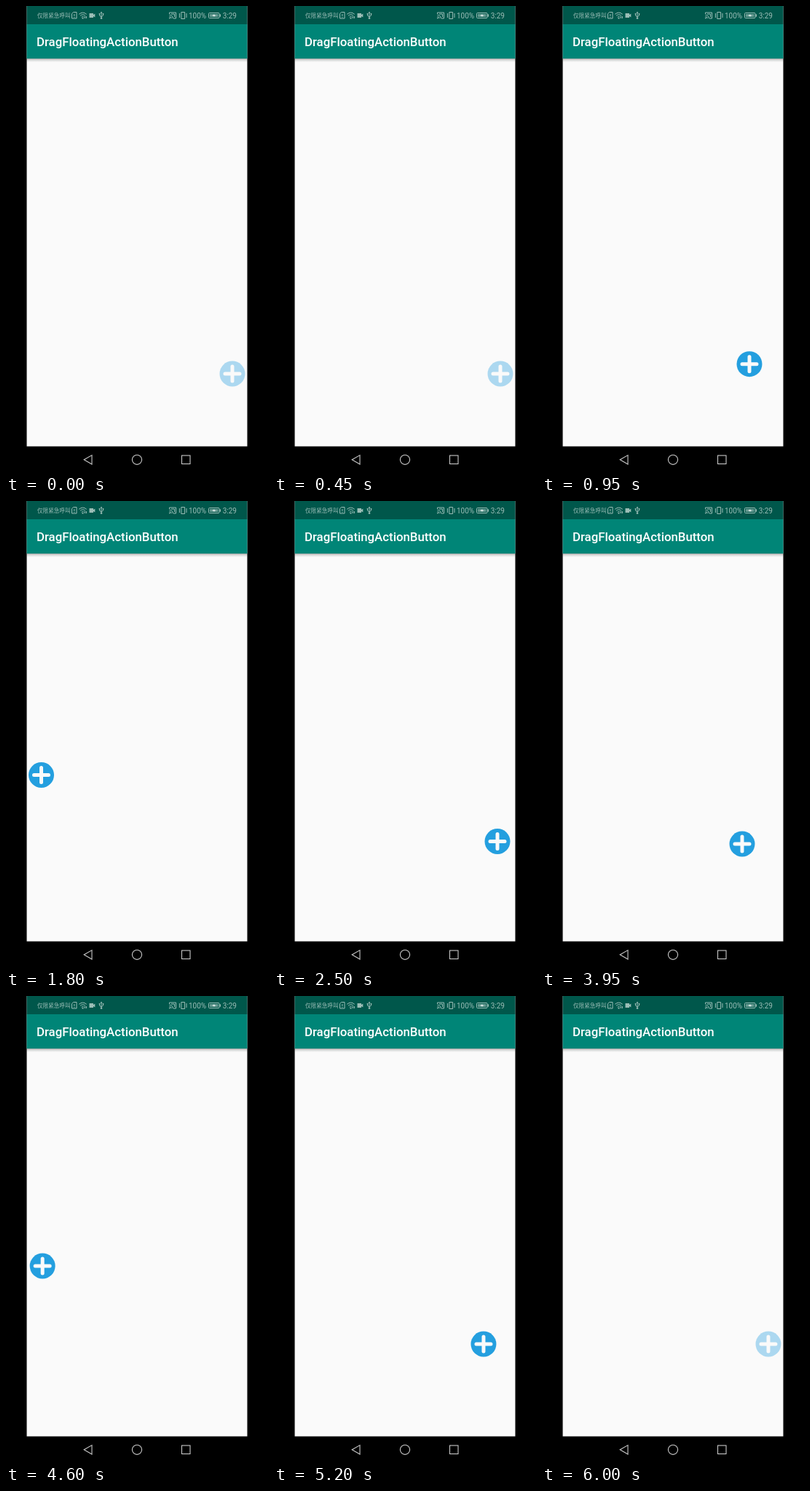
Animation, 360 px wide and 640 px high, one loop 6100 ms. Source, as an HTML page:

```html
<!DOCTYPE html>
<html lang="en">
<head>
<meta charset="utf-8">
<title>Draggable floating button</title>
<style>
  html, body { margin: 0; width: 100%; height: 100%; overflow: hidden; background: #000; }
  svg { display: block; width: 360px; height: 640px; }
  text { font-family: Roboto, "Noto Sans CJK SC", "Noto Sans CJK", sans-serif; }
  .status { fill: #9bbdb6; }
  .line { fill: none; stroke: #9bbdb6; stroke-width: 1; }
  .nav { fill: none; stroke: #c8c8c8; stroke-width: 1.1; }
</style>
</head>
<body>
<svg viewBox="0 0 360 640">
  <defs>
    <linearGradient id="shade" x2="0" y2="1">
      <stop offset="0" stop-color="#000" stop-opacity=".34"/>
      <stop offset=".4" stop-color="#000" stop-opacity=".13"/>
      <stop offset="1" stop-color="#000" stop-opacity="0"/>
    </linearGradient>
  </defs>
  <rect width="360" height="640"/>
  <rect x="28.5" width="303" height="603.5" fill="#fafafa"/>
  <rect x="28.5" width="303" height="25" fill="#00574b"/>
  <rect x="28.5" y="25" width="303" height="47" fill="#008577"/>
  <rect x="28.5" y="72" width="303" height="5" fill="url(#shade)"/>
  <text x="42" y="55.3" font-size="16.8" font-weight="500" fill="#fff">DragFloatingActionButton</text>

  <!-- Status bar, left -->
  <text class="status" x="43" y="15.8" font-size="7.6">仅限紧急呼叫</text>
  <path class="line" d="M92.5 8.5H97V17H90.5V10.5ZM93.8 11v3M93.8 15v1"/>
  <path class="line" d="M100.3 11.3Q105.5 6.8 110.7 11.3M102 13.3Q105.5 10.2 109 13.3M103.8 15.2Q105.5 13.7 107.2 15.2"/>
  <path class="status" d="M104.5 16h2v1.4h-2zM108 14h1v3h-1zM110 14h1v3h-1z"/>
  <path class="status" d="M114.5 10h5.5v2l2.3-1.5v5L120 14v2h-5.5z"/>
  <path class="line" stroke-width=".9" d="M131 9V17M128.5 11v2.2L131 14.8L133.5 13V11"/>
  <path class="status" d="M131 7.5l1.5 2.3h-3zM129.8 15.8h2.4v2h-2.4zM127.7 10h1.6v1.6h-1.6zM132.7 10h1.6v1.6h-1.6z"/>

  <!-- Status bar, right -->
  <path class="line" d="M224.5 11V9H233.5V17H230M224.5 12.2Q229 12.5 229.3 17M224.5 14.3Q227 14.5 227.2 17M227 11h4.5v4"/>
  <path class="status" d="M224 15.7h1.6v1.6H224z"/>
  <path class="line" d="M240.8 8.5h4.8v9h-4.8zM238.4 10v6M248 10v6"/>
  <text class="status" x="251" y="16.6" font-size="10">100%</text>
  <rect class="line" x="278.5" y="9.5" width="14.5" height="7" rx="1"/>
  <rect class="status" x="280" y="11" width="11.5" height="4" opacity=".65"/>
  <rect class="status" x="293.5" y="11.3" width="1.5" height="3.4"/>
  <path d="M282.8 13.3L286.5 11.3V12.7H289L285.3 14.8V13.4Z" fill="#e1efec"/>
  <text class="status" x="297.7" y="16.6" font-size="10">3:29</text>

  <!-- Navigation bar -->
  <path class="nav" d="M107.2 621.8L118 615.6V628Z"/>
  <circle class="nav" cx="180" cy="621.8" r="6.6"/>
  <rect class="nav" x="241.5" y="616" width="11.5" height="11.5"/>

  <g id="fab">
    <circle r="17.5" fill="#249fdf"/>
    <path d="M-10 0H10M0 -10V10" fill="none" stroke="#fafafa" stroke-width="5" stroke-linecap="round"/>
  </g>
</svg>
<script>
const LOOP = 6100, STEP = 50, LEFT = 48.5, RIGHT = 311;
const drag = u => (1 - Math.cos(Math.PI * u)) / 2;
const snap = u => 1 - (1 - u) ** 2;

// [start, end, x, y, ease]: each move begins where the last one ended
const moves = [
  [805, 1500, 60, 375.5, drag],
  [1500, 1750, LEFT, 375.5, snap],
  [1850, 2300, 275, 466.5, drag],
  [2300, 2600, RIGHT, 466.5, snap],
  [2700, 3400, 112, 548.6, drag],
  [3400, 3600, LEFT, 548.6, snap],
  [3600, 3950, 275, 470, drag],
  [3950, 4100, RIGHT, 470, snap],
  [4100, 4450, 75, 370, drag],
  [4450, 4650, LEFT, 370, snap],
  [4700, 5150, 275, 477, drag],
  [5150, 5400, RIGHT, 477, snap]
];

function place(t) {
  let x = RIGHT, y = 504;
  for (const [start, end, toX, toY, ease] of moves) {
    if (t < start) break;
    const p = ease(Math.min(1, (t - start) / (end - start)));
    x += (toX - x) * p;
    y += (toY - y) * p;
  }
  return [x, y];
}

const fab = document.getElementById("fab");
const origin = performance.now();

function draw() {
  const elapsed = (performance.now() - origin) % LOOP;
  const t = Math.floor(elapsed / STEP) * STEP;
  const idle = t < 800 || t >= 5950;
  fab.setAttribute("transform", `translate(${place(t)})`);
  fab.setAttribute("opacity", idle ? 0.36 : 1);
  requestAnimationFrame(draw);
}
draw();
</script>
</body>
</html>
```
